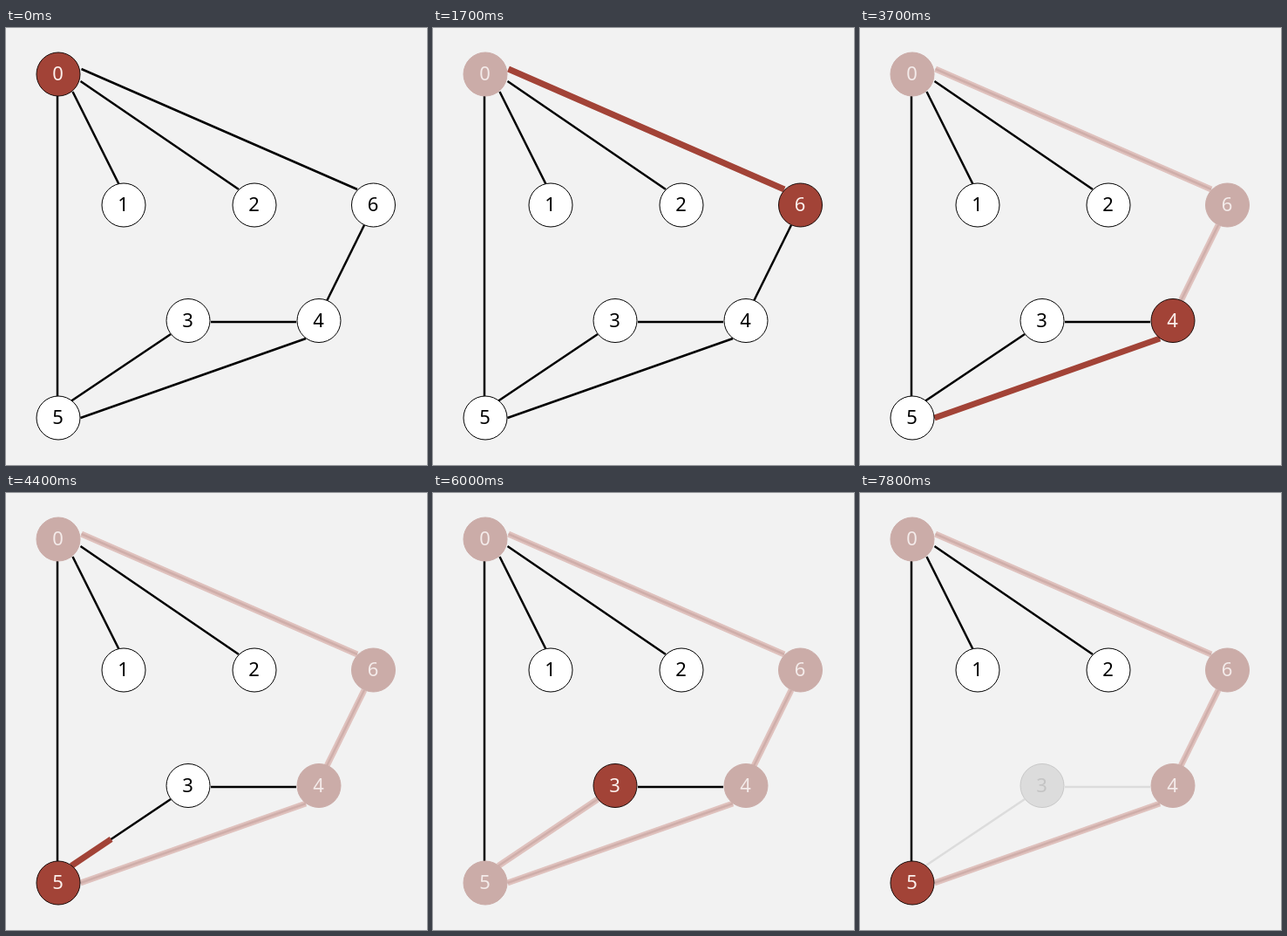
An HTML page for the animation above (8000 ms loop, 483 px wide and 501 px high).

```html
<!DOCTYPE html>
<html lang="en">
<head>
<meta charset="utf-8">
<title>Depth-first search</title>
<style>
  html, body { margin: 0; width: 100%; height: 100%; overflow: hidden; background: #f2f2f2; }
  svg { display: block; width: 483px; height: 501px; }
  text { font: 22px "Noto Sans", "Open Sans", sans-serif; text-anchor: middle; }
</style>
</head>
<body>
<svg id="stage" viewBox="0 0 483 501"></svg>
<script>
const LOOP = 8000, STEP = 100;

// fill, outline, label
const LOOK = {
  open: [[255, 255, 255], [0, 0, 0], [0, 0, 0]],
  active: [[162, 67, 55], [25, 10, 8], [252, 241, 238]],
  seen: [[203, 172, 168], [203, 172, 168], [244, 235, 234]],
  done: [[220, 220, 220], [200, 200, 200], [196, 196, 196]]
};

// x, y, then [time, look, fade steps]
const NODES = [
  [60, 53, [[0, 'active'], [900, 'seen']]],
  [135, 203, [[0, 'open']]],
  [285, 203, [[0, 'open']]],
  [209, 335.5, [[0, 'open'], [5000, 'active'], [7400, 'done', 5]]],
  [359, 335.5, [[0, 'open'], [3000, 'active'], [4000, 'seen']]],
  [60, 447, [[0, 'open'], [4000, 'active'], [5000, 'seen'], [7400, 'active', 5]]],
  [421.5, 203, [[0, 'open'], [900, 'active'], [3000, 'seen']]]
];

// end points, when it turns pale, when it turns grey, highlights [start, end, steps, reversed]
const EDGES = [
  { at: [76.5, 73, 129.5, 179] },
  { at: [85.5, 61, 267, 185] },
  { at: [59, 78, 59, 422] },
  { at: [86.5, 47, 403, 185], pale: 900, runs: [[200, 900, 5], [1200, 1900, 6, true]] },
  { at: [411, 226, 368, 313], pale: 3000, runs: [[2200, 3000, 5]] },
  { at: [344, 356, 85.5, 447], pale: 4000, runs: [[3300, 4000, 5]] },
  { at: [75, 427.5, 189, 351], pale: 5000, grey: 7100, runs: [[4300, 5000, 5], [5300, 6000, 5, true]] },
  { at: [235, 337, 333, 337], grey: 7100, runs: [[6400, 7100, 5]] }
];

const stage = document.getElementById('stage');

function add(tag, attrs) {
  const el = document.createElementNS('http://www.w3.org/2000/svg', tag);
  set(el, attrs);
  return stage.appendChild(el);
}

function set(el, attrs) {
  for (const key in attrs) el.setAttribute(key, attrs[key]);
}

function line([x1, y1, x2, y2], stroke, width) {
  return add('line', { x1, y1, x2, y2, stroke, 'stroke-width': width });
}

const mix = (a, b, p) => `rgb(${a.map((v, i) => Math.round(v + (b[i] - v) * p))})`;
const show = (el, on) => el.setAttribute('visibility', on ? 'visible' : 'hidden');
const progress = (t, start, steps) => Math.min(1, (Math.floor((t - start) / STEP) + 1) / steps);

for (const edge of EDGES) {
  edge.halo = line(edge.at, '#dfc1bd', 7);
  edge.core = line(edge.at, '#000', 2.5);
  edge.mark = line(edge.at, '#a24337', 7);
}

const discs = NODES.map(([x, y], i) => {
  const disc = add('circle', { cx: x, cy: y, r: 25 });
  const label = add('text', { x: x - 0.5, y: y + 7 });
  label.textContent = i;
  return { disc, label };
});

function drawEdge(edge, t) {
  const grey = t >= edge.grey, pale = t >= edge.pale && !grey;
  show(edge.halo, pale);
  set(edge.core, {
    stroke: grey ? '#dcdcdc' : pale ? '#cfaeaa' : '#000',
    'stroke-width': 2.5
  });
  const run = (edge.runs || []).find(([start, end]) => t >= start && t < end);
  show(edge.mark, run);
  if (!run) return;
  const [start, , steps, reversed] = run;
  const [ax, ay, bx, by] = edge.at;
  const [x1, y1, x2, y2] = reversed ? [bx, by, ax, ay] : edge.at;
  const p = progress(t, start, steps);
  set(edge.mark, { x1, y1, x2: x1 + (x2 - x1) * p, y2: y1 + (y2 - y1) * p });
}

function drawNode([, , looks], { disc, label }, t) {
  const i = looks.filter(([time]) => t >= time).length - 1;
  const [start, name, steps] = looks[i];
  const from = LOOK[looks[Math.max(0, i - 1)][1]], to = LOOK[name];
  const p = steps ? progress(t, start, steps) : 1;
  const [fill, stroke, ink] = to.map((c, k) => mix(from[k], c, p));
  set(disc, { fill, stroke });
  set(label, { fill: ink });
}

const began = performance.now();

function draw() {
  const t = (performance.now() - began) % LOOP;
  EDGES.forEach(edge => drawEdge(edge, t));
  NODES.forEach((node, i) => drawNode(node, discs[i], t));
  requestAnimationFrame(draw);
}
draw();
</script>
</body>
</html>
```
